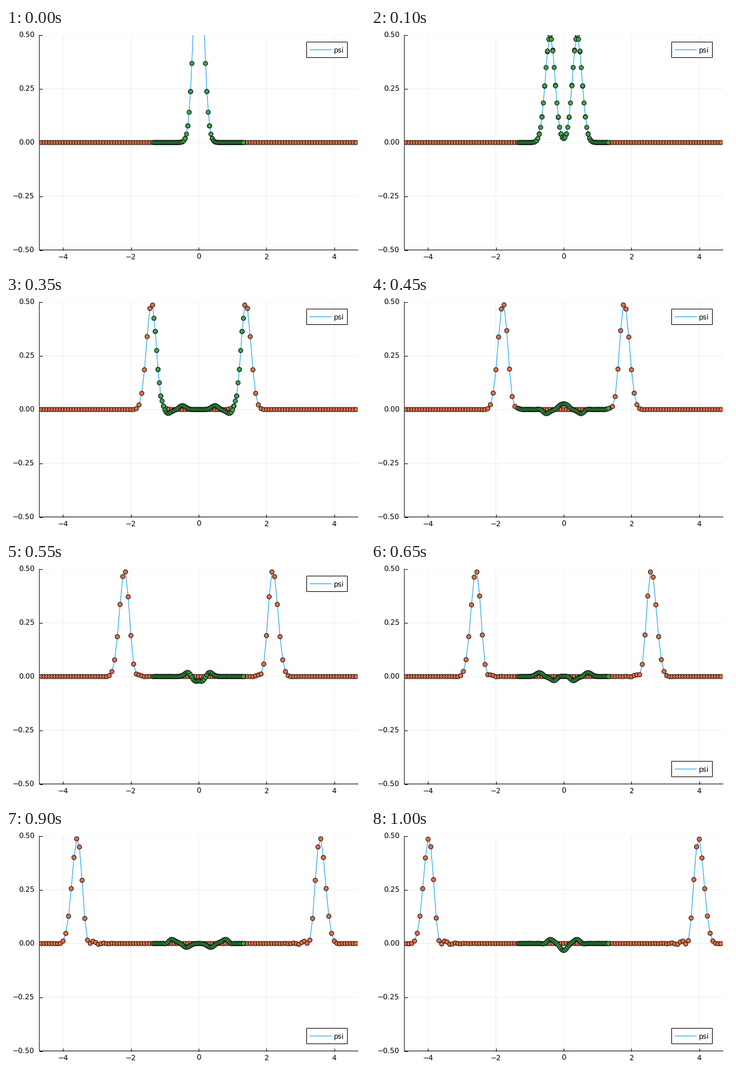
A matplotlib script for the animation above (1050 ms loop, 600x400 px).

```python
import numpy as np
import matplotlib.pyplot as plt
from matplotlib.animation import FuncAnimation
from matplotlib.patches import Rectangle

W, H = 600, 400
PT = 0.72                       # points per pixel at 100 dpi
FRAMES, STEPS = 21, 10          # coarse time steps per frame
BLUE, ORANGE, GREEN = "#009afa", "#e36f47", "#3ea44e"

plt.rcParams["path.snap"] = False
plt.rcParams["text.hinting"] = "none"

# Wave equation on a coarse grid with a refined patch in the middle
H_C, H_F, DT = 0.08, 0.04, 0.02
x_c = np.arange(-58, 59) * H_C
x_f = np.arange(-33, 34) * H_F
ghost = np.abs(x_f) > 1.02
STENCIL = np.array([-1, 16, -30, 16, -1]) / 12


def rk4(state, dx, dt, active=1.0):
    """Advance (psi, pi) by dt; points that are not active stay frozen."""
    def rate(s):
        lap = np.convolve(s[0], STENCIL, "same") / dx**2
        return np.array([s[1], lap]) * active

    k1 = rate(state)
    k2 = rate(state + dt / 2 * k1)
    k3 = rate(state + dt / 2 * k2)
    k4 = rate(state + dt * k3)
    return state + dt / 6 * (k1 + 2 * k2 + 2 * k3 + k4)


def pulse(x):
    return np.array([np.exp(-(x / 0.2) ** 2), np.zeros_like(x)])


def simulate():
    coarse, fine = pulse(x_c), pulse(x_f)
    inner = np.where(ghost, 0.0, 1.0)
    out = [(coarse[0], fine[0])]
    for _ in range(FRAMES - 1):
        for _ in range(STEPS):
            coarse = rk4(coarse, H_C, DT)
            fine = fine.copy()
            for c, f in zip(coarse, fine):
                f[ghost] = np.interp(x_f[ghost], x_c, c)
            for _ in range(2):
                fine = rk4(fine, H_F, DT / 2, inner)
        out.append((coarse[0], fine[0]))
    return out


history = simulate()

fig = plt.figure(figsize=(W / 100, H / 100), dpi=100, facecolor="white")
left, right, top, bottom = 55.8, 588.3, 11.8, 371.5
ax = fig.add_axes([left / W, 1 - bottom / H, (right - left) / W, (bottom - top) / H])
ax.set(xlim=(-4.7, 4.7), ylim=(-0.5, 0.5))
x_ticks, y_ticks = np.arange(-4, 5, 2), np.linspace(-0.5, 0.5, 5)
ax.set_xticks(x_ticks)
ax.set_yticks(y_ticks)
ax.set_axisbelow(True)
ax.grid(color="#eeeeee", lw=PT)
ax.tick_params(direction="in", length=5 * PT, width=PT, labelleft=False, labelbottom=False)
for side in ("top", "right"):
    ax.spines[side].set_visible(False)
for side in ("left", "bottom"):
    ax.spines[side].set_linewidth(PT)

# Text and legend are laid out in pixels
over = fig.add_axes([0, 0, 1, 1])
over.set(xlim=(0, W), ylim=(H, 0))
over.axis("off")


def write(x, y, text, ha="left"):
    return over.text(x, y, text.replace("-", "\u2212"), fontsize=12 * PT,
                     ha=ha, va="baseline", zorder=2)


for v in x_ticks:
    write(np.interp(v, [-4.7, 4.7], [left, right]), 387, f"{v}", "center")
for v in y_ticks:
    write(47.8, np.interp(v, [-0.5, 0.5], [bottom, top]) + 4.3, f"{v:.2f}", "right")

box = over.add_patch(Rectangle((502.5, 0), 68, 26, fc="white", ec="black", lw=PT, zorder=1))
sample, = over.plot([], [], color=BLUE, lw=PT, zorder=2)
label = write(548, 0, "psi")


def dots(x, color):
    size = np.full(x.size, (7.3 * PT) ** 2)
    return ax.scatter(x, 0 * x, s=size, fc=color, ec="black", lw=0.9 * PT, zorder=3)


curve, = ax.plot([], [], color=BLUE, lw=PT)
coarse_dots, fine_dots = dots(x_c, ORANGE), dots(x_f, GREEN)


def place_legend(y):
    box.set_y(y)
    sample.set_data([508, 544], [y + 13, y + 13])
    label.set_y(y + 17.4)


def draw(i):
    coarse, fine = history[i]
    curve.set_data(x_c, coarse)
    coarse_dots.set_offsets(np.column_stack([x_c, coarse]))
    fine_dots.set_offsets(np.column_stack([x_f, fine]))
    place_legend(23.5 if i < 12 else 333.5)
    return curve, coarse_dots, fine_dots, box, sample, label


anim = FuncAnimation(fig, draw, frames=FRAMES, interval=50, repeat=True, repeat_delay=0)
plt.show()
```
